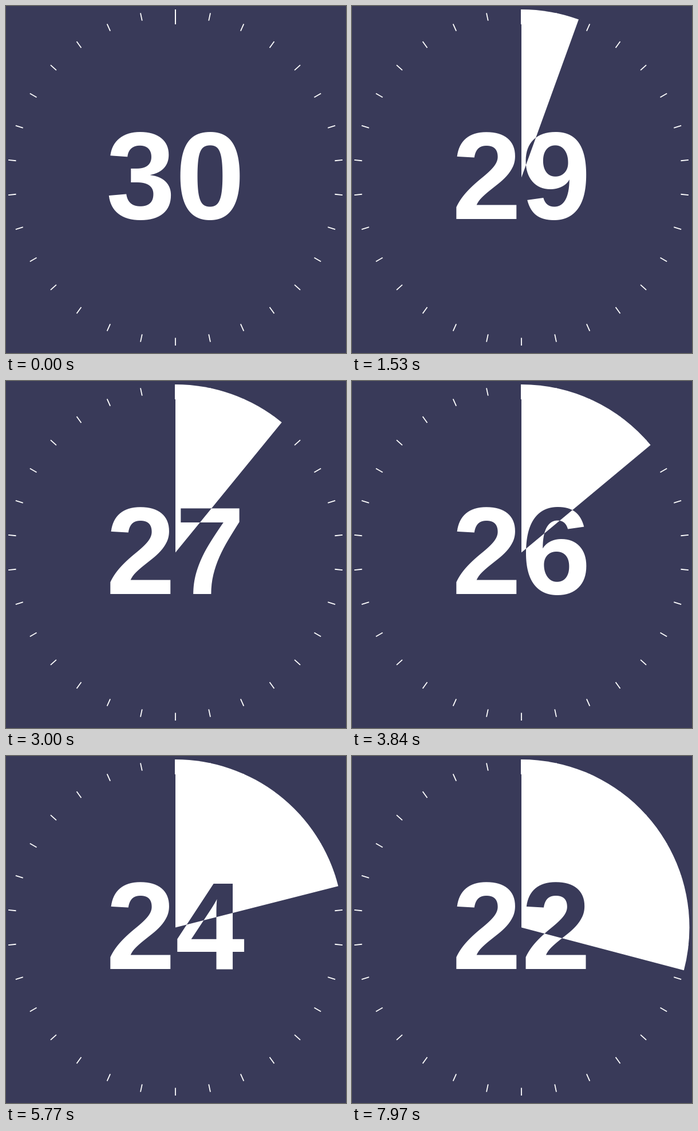
These frames come from a looping animation (594 px wide and 606 px high, 8 s). An HTML page with a canvas:

```html
<!DOCTYPE html>
<html lang="en">
<head>
<meta charset="utf-8">
<title>Countdown</title>
<style>
  html, body { margin: 0; width: 100%; height: 100%; overflow: hidden; background: #393a59; }
  canvas { display: block; }
</style>
</head>
<body>
<canvas id="dial" width="594" height="606"></canvas>
<script>
const ctx = document.getElementById('dial').getContext('2d');
const LOOP = 8000;
const CENTER = { x: 296, y: 299.5 };
const RADIUS = 293.5;
const TICKS = 30;
const TICK_ANGLE = 360 / TICKS;
const DEGREES_PER_STEP = 0.4395;
const rad = degrees => degrees * Math.PI / 180;

function drawWedge(degrees) {
  if (degrees <= 0) return;
  ctx.beginPath();
  ctx.moveTo(CENTER.x, CENTER.y);
  ctx.arc(CENTER.x, CENTER.y, RADIUS, rad(-90), rad(degrees - 90));
  ctx.fill();
}

function drawTicks() {
  for (let i = 0; i < TICKS; i++) {
    ctx.save();
    ctx.translate(CENTER.x, CENTER.y);
    ctx.rotate(rad(i * TICK_ANGLE));
    ctx.lineWidth = i ? 1.8 : 2;
    ctx.beginPath();
    ctx.moveTo(0, -RADIUS);
    ctx.lineTo(0, i ? -280 : -267.5);
    ctx.stroke();
    ctx.restore();
  }
}

function draw(time) {
  // The dial advances in discrete steps, 30 per second.
  const step = Math.floor(time * 0.03 + 0.15);
  const degrees = Math.max(0, step * DEGREES_PER_STEP - 0.3);

  ctx.clearRect(0, 0, 594, 606);
  ctx.fillStyle = ctx.strokeStyle = '#fff';
  drawWedge(degrees);

  // Digits invert wherever the wedge covers them.
  ctx.globalCompositeOperation = 'xor';
  ctx.font = 'bold 218px "Liberation Sans", Arial, sans-serif';
  ctx.textAlign = 'center';
  ctx.fillText(TICKS - Math.floor(degrees / TICK_ANGLE), CENTER.x, 372);

  ctx.globalCompositeOperation = 'source-over';
  drawTicks();
}

const start = performance.now();
function tick() {
  draw((performance.now() - start) % LOOP);
  requestAnimationFrame(tick);
}
tick();
</script>
</body>
</html>
```
